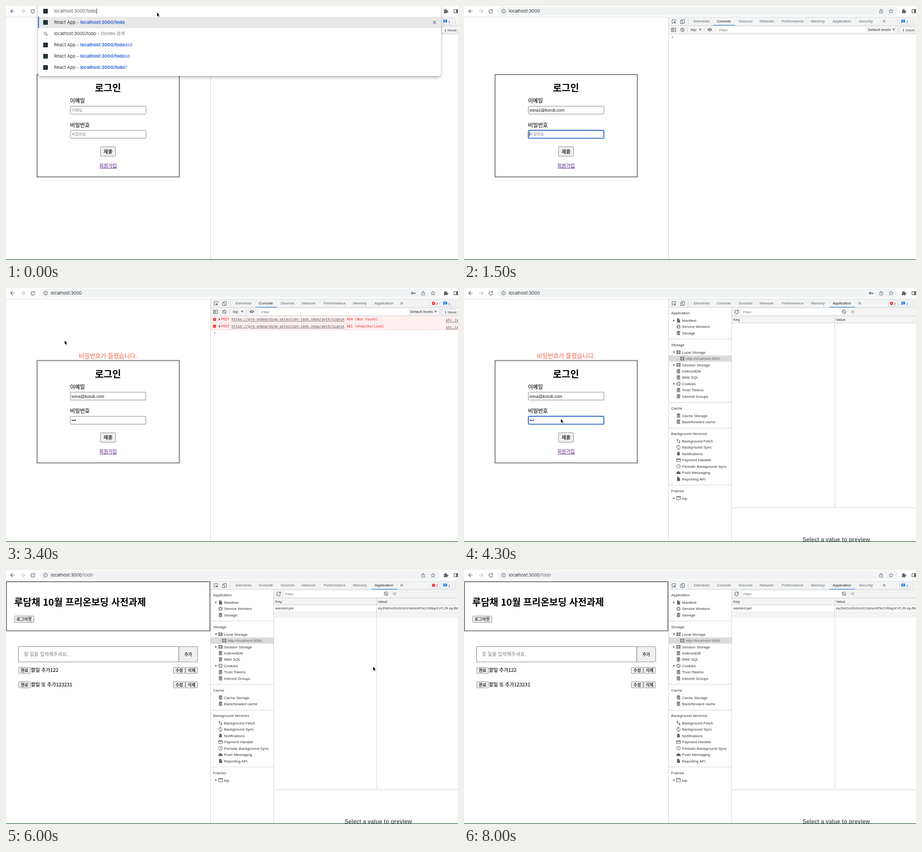
Animation of 960 by 541 pixels, one loop 8.31 s. Source, as an HTML page:

```html
<!DOCTYPE html>
<html lang="ko">
<head>
<meta charset="utf-8">
<title>Todo login</title>
<style>
html, body { margin: 0; width: 100%; height: 100%; overflow: hidden; background: #fff; }
svg { display: block; width: 100%; height: 100%; }
text { white-space: pre; }
.ui { font-family: Inter, Roboto, sans-serif; }
.dev { font-family: "Liberation Sans", Arial, sans-serif; }
.mono { font-family: "DejaVu Sans Mono", monospace; }
.ko { font-family: "Noto Sans CJK KR", "Noto Sans CJK", "Noto Sans KR", sans-serif; }
</style>
</head>
<body>
<svg id="stage" viewBox="0 0 960 541"></svg>
<script>
const LOOP = 8310;
const stage = document.getElementById('stage');
const GREY = '#5f6368', DARK = '#303336', BLUE = '#3367d6', RED = '#e8201c', EDGE = '#808080';

// Drawing helpers; text is placed by its vertical centre.
const rect = (x, y, w, h, fill, more = '') =>
  `<rect x="${x}" y="${y}" width="${w}" height="${h}" fill="${fill}" ${more}/>`;
const path = (d, stroke, w = 1, fill = 'none') =>
  `<path d="${d}" stroke="${stroke}" stroke-width="${w}" fill="${fill}"/>`;
const hline = (x, y, x2, c = '#d0d2d5') => path(`M${x} ${y}H${x2}`, c);
const vline = (x, y, y2, c = '#d0d2d5') => path(`M${x} ${y}V${y2}`, c);
const circle = (x, y, r, fill, more = '') => `<circle cx="${x}" cy="${y}" r="${r}" fill="${fill}" ${more}/>`;
const text = (cls, size) => (x, y, s, fill = DARK, more = '') =>
  `<text class="${cls}" x="${x}" y="${y + size * 0.36}" font-size="${size}" fill="${fill}" ${more}>${s}</text>`;
const span = (s, fill, weight = 400) => `<tspan fill="${fill}" font-weight="${weight}">${s}</tspan>`;
const ko = (x, y, s, size, fill = '#111', more = '') => text('ko', size)(x, y, s, fill, more);
const ui = text('ui', 9.4), dev = text('dev', 8.1), mono = text('mono', 7.38);
const MID = 'text-anchor="middle"', BOLD = 'font-weight="700"';
const MEDIUM = 'font-weight="500" stroke="#111" stroke-width=".22"';

// Icons are drawn around their own centre.
const ICONS = {
  back: c => path('M4.5 0H-4M0 -4L-4 0L0 4', c, 1.2),
  reload: c => path('M3.2 -2.2A4 4 0 1 0 4 .8', c, 1.2) + path('M4.4 -4.4V-.8H.8Z', 'none', 0, c),
  info: c => circle(0, 0, 4, 'none', `stroke="${c}"`) + path('M0 -.6V2.2M0 -2.4V-1.4', c),
  share: c => path('M-1.4 -1.5H-3.2V4H3.2V-1.5H1.4M0 1.5V-4.4M-1.8 -2.6L0 -4.4L1.8 -2.6', c, 0.9),
  star: c => path('M0 -4.3L1.3 -1.4L4.4 -1.1L2.1 1L2.8 4.1L0 2.5L-2.8 4.1L-2.1 1L-4.4 -1.1L-1.3 -1.4Z', c, 0.9),
  key: c => circle(-2.4, 0, 1.8, 'none', `stroke="${c}" stroke-width="1.4"`) + path('M-.6 0H4.6M3.4 0V2.2', c, 1.4),
  puzzle: c => path('M-4 -2.5H-1.6A1.5 1.5 0 1 1 1.2 -2.5H3.3V-.2A1.5 1.5 0 1 1 3.3 2.4V4.6H.9A1.4 1.4 0 0 0 -1.7 4.6H-4V2A1.4 1.4 0 0 0 -4 -.4Z', 'none', 0, c),
  side: c => rect(-3.5, -3.5, 8, 7, 'none', `stroke="${c}" stroke-width="1.2"`) + rect(1, -3.5, 4, 7, c),
  lens: c => circle(-.8, -.8, 2.6, 'none', `stroke="${c}"`) + path('M1.2 1.2L4 4', c, 1.2),
  inspect: c => path('M3.5 -1V-4H-4V3.5H-1', c) + path('M-.8 -.8L4.4 1.2L2.2 2L4 4L3.2 4.6L1.4 2.8L.6 4.6Z', 'none', 0, c),
  device: c => path('M-2 -2V-4.4H4V3.8H0', c) + rect(-4, -1.5, 4, 6, 'none', `stroke="${c}"`),
  panel: c => rect(-4.5, -3.7, 9, 7.4, 'none', `stroke="${c}"`) + path('M-2.2 -4V4', c) + path('M-.6 -2V2L2.4 0Z', 'none', 0, c),
  clear: c => circle(0, 0, 3.7, 'none', `stroke="${c}" stroke-width="1.1"`) + path('M-2.6 -2.6L2.6 2.6', c, 1.1),
  eye: c => path('M-5 0Q0 -6.4 5 0Q0 6.4 -5 0Z', 'none', 0, c) + circle(0, 0, 2, '#fff') + circle(0, 0, 1.1, c),
  cross: c => path('M-3 -3L3 3M3 -3L-3 3', c, 1.1),
  down: c => path('M-2.3 -1.9H2.3L0 2.1Z', 'none', 0, c),
  right: c => path('M-1.6 -2.4V2.4L2 0Z', 'none', 0, c),
  chat: c => path('M-4 -3.5H4V2.5H-2L-4 4.2Z', 'none', 0, c) + path('M-2.4 -1.5H2.4M-2.4 .5H1', '#fff', 0.8),
  error: c => circle(0, 0, 3.4, c) + path('M-1.3 -1.3L1.3 1.3M1.3 -1.3L-1.3 1.3', '#fff', 0.9),
  doc: c => path('M-3 -4.4H1L3.4 -2V4.4H-3Z', 'none', 0, c) + path('M1 -4.2V-1.8H3.4', '#fff', 0.7),
  gear: c => circle(0, 0, 2.6, 'none', `stroke="${c}" stroke-width="1.2"`) +
    circle(0, 0, 3.9, 'none', `stroke="${c}" stroke-width="1.4" stroke-dasharray="1.6 2.48"`),
  db: c => path('M-3.6 -3A3.6 1.4 0 0 1 3.6 -3V3A3.6 1.4 0 0 1 -3.6 3Z', 'none', 0, c) +
    path('M-3.6 -2Q0 -.6 3.6 -2M-3.6 0Q0 1.4 3.6 0M-3.6 2Q0 3.4 3.6 2', '#fff', 0.7),
  grid: c => rect(-4.5, -3.7, 9, 7.4, c) + path('M-4.5 -1.2H4.5M-4.5 1.2H4.5M0 -3.7V3.7', '#fff', 0.8),
  cookie: c => circle(0, 0, 3.7, 'none', `stroke="${c}" stroke-width="1.2"`) +
    circle(-1, -1, .9, c) + circle(1.4, .8, .9, c) + circle(-1, 1.7, .7, c),
  swap: c => path('M-2 2V-3.6M-4 -1.8L-2 -3.8L0 -1.8M2 -2V3.6M0 1.8L2 3.8L4 1.8', c, 1.1),
  sync: c => path('M-3.3 1.4A3.5 3.5 0 0 1 1 -3.4M3.3 -1.4A3.5 3.5 0 0 1 -1 3.4', c, 1.2) +
    path('M.2 -5.2V-1.4L2.4 -3.3ZM-.2 5.2V1.4L-2.4 3.3Z', 'none', 0, c),
  bell: c => path('M-4 3L-2.8 1.6V-1A2.8 3 0 0 1 2.8 -1V1.6L4 3ZM-1 3.5H1V4.6H-1ZM-.6 -4.6H.6V-3H-.6Z', 'none', 0, c),
  card: c => rect(-4.2, -3.2, 8.4, 6.4, 'none', `stroke="${c}" rx=".6"`) + rect(-4.2, -1.8, 8.4, 1.6, c),
  clock: c => circle(0, 0, 4, 'none', `stroke="${c}"`) + path('M0 -2.4V0L1.8 1.2', c),
  cloud: c => path('M-2.6 3A2.2 2.2 0 0 1 -2.8 -1.3A3 3 0 0 1 2.7 -1A2 2 0 0 1 2.8 3Z', 'none', 0, c),
  frame: c => rect(-4.2, -3.5, 8.4, 7, 'none', `stroke="${c}"`) + path('M-4.2 -2.6H4.2', c, 1.4),
};
const icon = (name, x, y, c = GREY) => `<g transform="translate(${x} ${y})">${ICONS[name](c)}</g>`;

const button = (x, y, w, h, label, size) =>
  rect(x, y, w, h, '#efefef', `rx="1.5" stroke="${EDGE}" stroke-width=".9"`) +
  ko(x + w / 2, y + h / 2, label, size, '#111', `${MID} ${MEDIUM}`);

function addressBar({ path: tail, key }) {
  return rect(0, 0, 960, 24, '#fff') + rect(72, 1.5, 850, 19, '#f1f3f4', 'rx="9.5"') +
    hline(0, 23.5, 960, '#dadce0') +
    icon('back', 14, 11) + `<g transform="rotate(180 36 11)">${icon('back', 36, 11, '#b9bcbf')}</g>` +
    icon('reload', 57, 11) + icon('info', 84, 11) +
    ui(95, 11, 'localhost:3000' + span(tail, '#6b6f73')) +
    (key ? icon('key', 865, 11) : '') + icon('share', 886, 11) + icon('star', 907, 11) +
    icon('puzzle', 934, 11) + icon('side', 955, 11);
}

// Suggestion rows: [title, bold part, rest]
const APP = 'React App', HOST = 'localhost:3000';
const LISTS = {
  todo: { typed: HOST + '/todo', caret: 192.6, rows: [
    [APP, HOST + '/todo', ''], null, [APP, HOST + '/todo', 'asd'],
    [APP, HOST + '/todo', 'sd'], [APP, HOST + '/todo', '?']] },
  root: { typed: HOST + '/', caret: 172.8, rows: [
    [APP, HOST, ''], null, [APP, HOST + '/', 'login'], [APP, HOST + '/', 'signup'],
    ['여행할 땐 | 살랑길목', HOST + '/', 'search'], [APP, HOST + '/', 'todo']] },
};
const favicon = y => rect(79, y - 5, 10, 10, '#22333b', 'rx="1"');

function dropdown({ typed, caret, rows }) {
  const bottom = 29 + 24 * rows.length;
  return rect(68, -12, 855.5, bottom + 12, '#fff', 'rx="6" filter="url(#shade)"') +
    favicon(11) + ui(102, 11, typed, '#55585c') + vline(caret, 5.5, 16.5, '#333') +
    rect(68, 23, 855.5, 24, '#e8e8e8') + rect(68, 23, 2, 24, BLUE) + icon('cross', 910, 35) +
    rows.map((row, i) => {
      const y = 35 + 24 * i;
      if (!row) return icon('lens', 84, y) + ui(102, y, typed + span(' – Dovelu 검색', '#6b6f73'));
      const [title, bold, rest] = row;
      return favicon(y) + ui(102, y, title + span(' – ', '#6b6f73') + span(bold, BLUE, 700) + span(rest, BLUE));
    }).join('');
}

function field(y, value, hint, focus, secret) {
  const n = value.length;
  const dots = [...value].map((_, i) => circle(140.8 + 3.2 * i, y, 1.25, '#111')).join('');
  return rect(136.7, y - 8.4, 160.4, 16.8, '#fff', `rx="2" stroke="${focus ? '#2a66c0' : EDGE}" stroke-width="${focus ? 1.9 : 1}"`) +
    (n ? (secret ? dots : text('dev', 8.9)(139, y, value, '#111')) : ko(139, y, hint, 8.4, '#858585')) +
    (focus && !n ? vline(139.4, y - 5, y + 5, '#111') : '');
}

function login({ error, email, pass, focus }) {
  const dy = error ? 8.5 : 0;
  return (error ? ko(216.5, 144, error, 12.7, '#f0614a', MID) : '') +
    `<g transform="translate(0 ${dy})">` +
    rect(66, 146, 302, 218, '#fff', 'stroke="#808080" stroke-width="2"') +
    ko(216.5, 175, '로그인', 20.2, '#000', `${MID} ${BOLD}`) +
    ko(136, 202, '이메일', 11.4, '#111', MEDIUM) + field(221.8, email, '이메일', focus === 'email') +
    ko(136, 253.5, '비밀번호', 11.4, '#111', MEDIUM) + field(273.2, pass, '비밀번호', focus === 'pass', true) +
    button(200.7, 299.7, 32, 20.4, '제출', 10.3) +
    ko(216.8, 340, '회원가입', 10.1, '#551a8b', MID) + hline(198.5, 345.3, 235.5, '#551a8b') + '</g>';
}

function todo() {
  const item = (y, label) => button(27, y - 6.5, 25, 13, '완료', 8.7) + ko(53, y - .5, label, 10.35, '#111', MEDIUM) +
    button(355.5, y - 6.5, 25, 13, '수정', 8.7) + button(381.7, y - 6.5, 25, 13, '삭제', 8.7);
  return rect(1, 25, 432, 104.5, '#fff', 'stroke="#808080" stroke-width="2"') +
    ko(17.5, 69, '루담채 10월 프리온보딩 사전과제', 20, '#000', BOLD) +
    button(18, 98, 41, 13.6, '로그아웃', 8.9) +
    rect(26.5, 163, 340.5, 32.8, '#fff', `stroke="${EDGE}"`) +
    ko(38, 179, '할 일을 입력해주세요.', 10.3, '#808080') +
    button(367, 163, 40, 32.8, '추가', 8.8) +
    item(213.8, '할일 추가122') + item(244.5, '할일 또 추가123231');
}

const TABS = [['Elements', 488], ['Console', 537], ['Sources', 583], ['Network', 628], ['Performance', 675],
  ['Memory', 737], ['Application', 783], ['Security', 839]];

function devtools(s) {
  const app = s.panel === 'Application';
  const [from, to] = app ? [776, 831] : [530, 575];
  return rect(434, 24, 526, 517, '#fff') + rect(434, 24, 526, 17.5, '#f1f3f4') + hline(434, 41.5, 960) +
    icon('inspect', 446, 33) + icon('device', 464, 33) + vline(476.5, 27, 39) +
    TABS.slice(0, s.errors ? 7 : 8).map(([name, x]) => dev(x, 32.5, name, name === s.panel ? '#202124' : GREY)).join('') +
    text('dev', 12)(s.errors ? 837 : 889, 31.5, '»', GREY) +
    rect(from, 40.2, to - from, 1.4, '#4f88dc') +
    (s.errors ? rect(901, 27, 20, 11.5, '#f8f9fa', 'rx="1.5" stroke="#d4d6d9"') +
      icon('error', 908, 32.7, RED) + dev(913, 32.7, s.errors, RED) : '') +
    rect(925, 27, 22.5, 11.5, '#f8f9fa', 'rx="1.5" stroke="#d4d6d9"') + icon('chat', 932.8, 32.5, '#1a73e8') +
    dev(939, 32.7, '1', '#1a56b0') + vline(954.5, 27, 39) +
    (app ? storage(s) : consolePanel(s)) + vline(434.5, 24, 541);
}

function consolePanel({ errors }) {
  const row = (y, status) => rect(435, y - 7, 525, 14.6, '#fff0f0') + hline(435, y + 7.5, 960, '#fcd9d9') +
    icon('error', 443, y, RED) + icon('right', 453.5, y, '#555') +
    mono(457, y, 'POST', RED) + mono(479, y, 'https://pre-onboarding-selection-task.shop/auth/signin', '#4a4a4a', 'text-decoration="underline"') +
    mono(723, y, status, RED) + mono(934, y + 2, 'xhr.js:220', '#4a4a4a', 'text-decoration="underline"');
  return rect(435, 42, 525, 17.5, '#f3f3f4') + hline(435, 59.5, 960) +
    icon('panel', 445, 50.8) + icon('clear', 464, 50.8) + vline(474.5, 45, 57) +
    dev(482, 50.5, 'top') + icon('down', 501.5, 50.5) + vline(510.5, 45, 57) + icon('eye', 522, 50.5) +
    rect(538, 44.5, 315, 12.5, '#fff') + dev(542, 50.8, 'Filter', '#757575') +
    dev(858, 50.5, 'Default levels') + icon('down', 912.5, 50.5) + vline(921.5, 45, 57) +
    rect(925, 44.5, 40, 12.5, '#f8f9fa', 'rx="1.5" stroke="#d4d6d9"') + dev(931, 50.8, '1 Issue: ') +
    (errors > 0 ? row(66.8, '404 (Not Found)') : '') + (errors > 1 ? row(81.5, '401 (Unauthorized)') : '') +
    path(`M441.5 ${64.5 + 14.7 * errors}l2.5 2l-2.5 2`, '#6a9bea', 1.1);
}

// Sidebar sections: [heading, y, items [label, icon, arrow]]
const SIDE = [
  ['Application', 53.5, [['Manifest', 'doc', 1], ['Service Workers', 'gear'], ['Storage', 'db']]],
  ['Storage', 121.3, [['Local Storage', 'grid', 2], ['http://localhost:3000', 'grid'], ['Session Storage', 'grid', 1],
    ['IndexedDB', 'db'], ['Web SQL', 'db'], ['Cookies', 'cookie', 1], ['Trust Tokens', 'db'], ['Interest Groups', 'db']]],
  ['Cache', 256, [['Cache Storage', 'db'], ['Back/forward cache', 'db']]],
  ['Background Services', 310.5, [['Background Fetch', 'swap'], ['Background Sync', 'sync'], ['Notifications', 'bell'],
    ['Payment Handler', 'card'], ['Periodic Background Sync', 'clock'], ['Push Messaging', 'cloud'], ['Reporting API', 'doc']]],
  ['Frames', 432, [['top', 'frame', 1]]],
];

function storage({ token }) {
  const side = SIDE.map(([head, y, items], k) =>
    (k ? hline(435, Math.round(y - 12) - .5, 568) : '') + dev(440, y, head) +
    items.map(([label, name, arrow], i) => {
      const yy = y + 15.6 + 13.42 * i, open = label.startsWith('http'), dx = open ? 8 : 0;
      return (open ? rect(435, yy - 6.7, 133, 13.4, '#dadada') : '') +
        (arrow ? icon(arrow === 2 ? 'down' : 'right', 446, yy, '#666') : '') +
        icon(name, 455.5 + dx, yy) + dev(463 + dx, yy, label, open ? GREY : DARK);
    }).join('')).join('');
  return side + rect(568, 42, 392, 17.5, '#f3f3f4') + icon('reload', 579, 50.5) +
    rect(590, 44.5, 212, 12.5, '#fff') + dev(593, 50.8, 'Filter', '#757575') +
    icon('clear', 807, 50.5) + icon('cross', 825.5, 50.5, '#a5a8ab') +
    rect(568, 60, 392, 14.5, '#f3f3f4') + hline(568, 59.5, 960) + hline(568, 74.5, 960) +
    dev(572, 67.5, 'Key') + dev(790, 67.5, 'Value') +
    (token ? dev(572, 81.5, 'wanted-jwt') + dev(790, 81.5, 'eyJhbGciOiJIUzI1NiIsInR5cCI6IkpXVCJ9.eyJlbWFpbCI6') +
      rect(569, 88, 391, 13.3, '#f3f3f4') : '') +
    vline(787.5, 60, 468) + hline(568, 468, 960) + vline(568.5, 42, 541) +
    text('dev', 12.1)(719, 535.7, 'Select a value to preview', GREY, BOLD);
}

// Pointer stops: [time, x, y]
const STOPS = [[0, 320, 13], [300, 320, 13], [500, 292, 325], [800, 230, 218], [1700, 240, 290], [1900, 221, 310],
  [2000, 221, 310], [2300, 185, 226], [2700, 185, 226], [2900, 222, 318], [3100, 222, 318], [3300, 124, 111],
  [3700, 124, 111], [4000, 800, 30], [4100, 800, 30], [4300, 205, 278], [4500, 205, 278], [4700, 220, 318],
  [4800, 220, 318], [5100, 333, 314], [5500, 333, 314], [5900, 779, 205], [6100, 779, 205], [6300, 520, 275],
  [6600, 55, 8], [6700, 55, 8], [7000, 248, 12], [7400, 248, 12], [7600, 247, 7], [7800, 247, 7], [7900, 312, 2]];
const within = (t, a, b) => t >= a && t < b;

function pointer(t) {
  if (within(t, 1000, 1700) || within(t, 2500, 2800) || t >= 8000) return '';
  const i = Math.max(1, STOPS.findIndex(p => p[0] >= t));
  const [t0, x0, y0] = STOPS[i - 1], [t1, x1, y1] = STOPS[i];
  const u = (t - t0) / (t1 - t0), e = u * u * (3 - 2 * u);
  return `<g transform="translate(${x0 + (x1 - x0) * e} ${y0 + (y1 - y0) * e})">` +
    path('M.3 .3V9.6L2.4 7.7L4 11.2L5.7 10.4L4.2 7.1H6.9Z', '#fff', 0.8, '#000') + '</g>';
}

function stateAt(t) {
  const first = 'sona2@korub.com';
  return {
    list: t < 200 ? LISTS.todo : within(t, 7300, 7500) ? LISTS.root : null,
    path: t >= 4800 && t !== 7500 ? '/todo' : '',
    key: within(t, 1600, 5700),
    todo: t >= 4800,
    panel: t < 4100 ? 'Console' : 'Application',
    errors: within(t, 2000, 6700) ? (t < 3100 ? 1 : 2) : 0,
    token: t >= 4800,
    error: t < 2000 ? '' : t < 3100 ? '존재하지 않는 이메일입니다.' : '비밀번호가 틀렸습니다.',
    email: t >= 2600 ? 'sona@korub.com' : first.slice(0, Math.max(0, Math.round((t - 900) / 400 * first.length))),
    pass: '1234567'.slice(0, t < 1600 ? 0 : t < 1700 ? 2 : t < 4400 ? 3 : t < 4500 ? 5 : 7),
    focus: within(t, 800, 1400) || within(t, 2300, 2900) ? 'email' :
      within(t, 1400, 1900) || within(t, 4300, 4700) ? 'pass' : '',
  };
}

const SHADE = '<defs><filter id="shade" x="-5%" y="-20%" width="110%" height="150%">' +
  '<feDropShadow dx="0" dy="3" stdDeviation="3.4" flood-color="#000" flood-opacity=".31"/></filter></defs>';

function draw(t) {
  const s = stateAt(t);
  stage.innerHTML = SHADE + rect(0, 0, 960, 541, '#fff') + (s.todo ? todo() : login(s)) + devtools(s) +
    addressBar(s) + (s.list ? dropdown(s.list) : '') + rect(0, 539.8, 960, 1.2, '#1c5a2c') + pointer(t);
}

let shown = -1;
const start = performance.now();
function tick() {
  const t = Math.min(8000, Math.floor(((performance.now() - start) % LOOP) / 100) * 100);
  if (t !== shown) draw(shown = t);
  requestAnimationFrame(tick);
}
tick();
</script>
</body>
</html>
```
